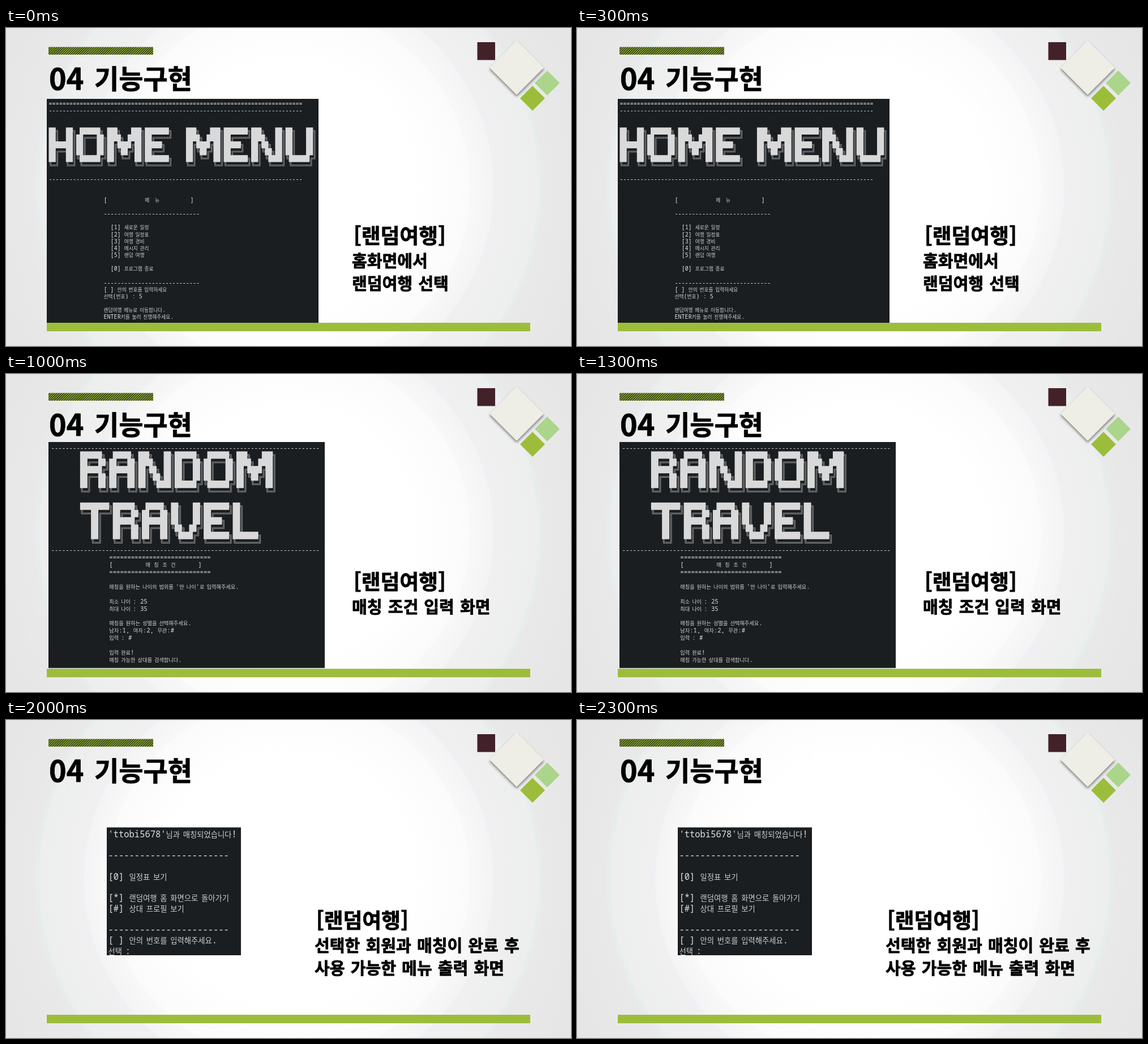
Animation of 998x561 px, one loop 2.5 s. Source, as an HTML page:

```html
<!DOCTYPE html>
<html lang="ko">
<head>
<meta charset="utf-8">
<style>
  html, body { margin: 0; width: 100%; height: 100%; overflow: hidden; background: #e6e6e7; }
  svg { display: block; }
  text { white-space: pre; }
  .term { font-family: "Noto Sans Mono", monospace; fill: #e0e0e0; }
  .ko { font-family: "Noto Sans CJK KR", sans-serif; font-size: .861em; word-spacing: .153em; fill: #cfcfcf; }
  .title { font-family: "Noto Sans CJK KR", sans-serif; font-weight: 900; word-spacing: 2px;
    stroke: #000; stroke-width: .8; stroke-linejoin: round; }
  .cream { filter: drop-shadow(0 3px 2px #0007); }
</style>
</head>
<body>
<svg width="998" height="561" viewBox="0 0 998 561">
  <defs>
    <radialGradient id="rings" gradientUnits="userSpaceOnUse" cx="499.5" cy="280.5" r="580">
      <stop offset=".38" stop-color="#fff"/>
      <stop offset=".55" stop-color="#fbfbfb"/>
      <stop offset=".555" stop-color="#f8f8f8"/>
      <stop offset=".622" stop-color="#f4f4f5"/>
      <stop offset=".624" stop-color="#edf1f6"/>
      <stop offset=".632" stop-color="#f0f0f1"/>
      <stop offset=".758" stop-color="#edeeee"/>
      <stop offset=".764" stop-color="#e5eeee"/>
      <stop offset=".776" stop-color="#e9e9ea"/>
      <stop offset="1" stop-color="#e5e5e6"/>
    </radialGradient>
    <pattern id="hatch" width="2.9" height="2.9" patternUnits="userSpaceOnUse" patternTransform="rotate(45)">
      <rect width="2.9" height="2.9" fill="#9cbd3c"/>
      <rect width="1.4" height="2.9" fill="#1c220c"/>
    </pattern>
  </defs>
  <rect width="998" height="561" fill="url(#rings)"/>
  <rect x="75" y="33.5" width="185" height="13.5" fill="url(#hatch)"/>
  <rect x="832.5" y="25" width="31.5" height="31.5" fill="#432129"/>
  <path class="cream" d="M902 22l48 48-48 48-48-48z" fill="#eeeee6"/>
  <path d="M956 75l22 22-22 22-22-22z" fill="#abd58b"/>
  <path d="M930 102l22 22-22 22-22-22z" fill="#9cbd3c"/>
  <text class="title" x="76" y="109" font-size="52">04</text>
  <text class="title" x="156" y="106.5" font-size="47">기능구현</text>
  <g id="stage"></g>
  <rect x="72" y="520" width="854" height="15" fill="#9cbd3c"/>
</svg>
<script>
const GLYPHS = {
  ' ': '    ',
  H: '██╗  ██╗/██║  ██║/███████║/██╔══██║/██║  ██║/╚═╝  ╚═╝',
  O: ' ██████╗ /██╔═══██╗/██║   ██║/██║   ██║/╚██████╔╝/ ╚═════╝',
  M: '███╗   ███╗/████╗ ████║/██╔████╔██║/██║╚██╔╝██║/██║ ╚═╝ ██║/╚═╝     ╚═╝',
  E: '███████╗/██╔════╝/█████╗/██╔══╝/███████╗/╚══════╝',
  N: '███╗   ██╗/████╗  ██║/██╔██╗ ██║/██║╚██╗██║/██║ ╚████║/╚═╝  ╚═══╝',
  U: '██╗   ██╗/██║   ██║/██║   ██║/██║   ██║/╚██████╔╝/ ╚═════╝',
  R: '██████╗ /██╔══██╗/██████╔╝/██╔══██╗/██║  ██║/╚═╝  ╚═╝',
  A: ' █████╗ /██╔══██╗/███████║/██╔══██║/██║  ██║/╚═╝  ╚═╝',
  D: '██████╗ /██╔══██╗/██║  ██║/██║  ██║/██████╔╝/╚═════╝',
  T: '████████╗/╚══██╔══╝/   ██║/   ██║/   ██║/   ╚═╝',
  V: '██╗   ██╗/██║   ██║/██║   ██║/╚██╗ ██╔╝/ ╚████╔╝/  ╚═══╝',
  L: '██╗     /██║/██║/██║/███████╗/╚══════╝'
};
// Direction of the horizontal and vertical arm of each corner
const CORNERS = { '╔': [1, 1], '╗': [-1, 1], '╚': [1, -1], '╝': [-1, -1] };
const dash = n => '-'.repeat(n), double = n => '='.repeat(n);
const spaced = word => [...word].join('\u00a0');

// box: panel x, y, right, bottom; x0, y0: first column and middle of the first row
// w, h: cell size; art: [row, col, word]; lines: [row, col, text]
const SCENES = [
  { box: [72, 125, 552, 520], x0: 75.5, y0: 133, w: 6.06, h: 12.16,
    art: [[4, 0, 'HOME MENU']],
    lines: [
      [0, 0, double(74)], [1, 0, dash(74)], [11, 0, dash(74)],
      [14, 16, '['], [14, 28, '메  뉴'], [14, 41.3, ']'], [16, 16, dash(28)],
      [18, 18, '[1] 새로운 일정'], [19, 18, '[2] 여행 일정표'], [20, 18, '[3] 여행 경비'],
      [21, 18, '[4] 메시지 관리'], [22, 18, '[5] 랜덤 여행'], [24, 18, '[0] 프로그램 종료'],
      [26, 16, dash(28)], [27, 16, '[ ] 안의 번호를 입력하세요'], [28, 16, '선택(번호) : 5'],
      [30, 16, '랜덤여행 메뉴로 이동합니다.'], [31, 16, 'ENTER키를 눌러 진행해주세요.']],
    caption: ['홈화면에서', '랜덤여행 선택'] },
  { box: [72, 122, 539.5, 520], x0: 77.7, y0: 130, w: 6.16, h: 12.37,
    art: [[3, 8, 'RANDOM'], [10, 8, 'TRAVEL']],
    lines: [
      [0, 0, dash(74)], [1, 0, double(74)], [16, 0, dash(74)],
      [18, 16, '['], [18, 26, spaced('랜덤여행')], [18, 40.5, ']'], [19, 16, dash(28)],
      [21, 16, '[1] 매칭 상대 찾기'], [22, 16, '[2] 매칭 상대 프로필 보기'],
      [24, 16, '[*] 홈 화면으로 돌아가기'], [26, 16, dash(28)],
      [27, 16, '[ ] 안의 번호를 입력하세요'], [28, 16, '입력 : 1'],
      [30, 16, '매칭 상대 찾기 메뉴로 이동합니다.'], [31, 16, 'ENTER키를 눌러 진행해주세요.']],
    caption: ['랜덤여행 홈 화면'] },
  { box: [75, 120, 563, 518.7], x0: 79.5, y0: 130, w: 6.42, h: 12.9,
    art: [[1, 8, 'RANDOM'], [8, 8, 'TRAVEL']],
    lines: [
      [0, 0, dash(74)], [14, 0, dash(74)], [15, 16, double(28)],
      [16, 16, '['], [16, 26, spaced('매칭조건')], [16, 40.5, ']'], [17, 16, double(28)],
      [19, 16, "매칭을 원하는 나이의 범위를 '만 나이'로 입력해주세요."],
      [21, 16, '최소 나이 : 25'], [22, 16, '최대 나이 : 35'],
      [24, 16, '매칭을 원하는 성별을 선택해주세요.'], [25, 16, '남자:1, 여자:2, 무관:#'],
      [26, 16, '입력 : #'], [28, 16, '입력 완료!'], [29, 16, '매칭 가능한 상대를 검색합니다.']],
    caption: ['매칭 조건 입력 화면'] },
  { box: [77, 111, 474, 518.7], x0: 82.8, y0: 114, w: 5.25, h: 10.51,
    art: [[3, 8, 'RANDOM'], [10, 8, 'TRAVEL']],
    lines: [
      [0, 0, dash(74)], [1, 0, double(74)], [16, 0, dash(74)],
      [17, 24, '['], [17, 32, '매칭 가능 목록'], [17, 45.5, ']'], [19, 0, double(73)],
      [20, 0, '번호'], [20, 8, '아이디'], [20, 24, '생년'], [20, 32, '성별'], [20, 40, '날짜'], [20, 56, '공통테마'],
      [21, 0, double(73)],
      [22, 0, '[1]'], [22, 8, 'mopvk4071'], [22, 24, '1964'], [22, 32, '여'], [22, 40, '20190310'], [22, 56, '맛집 카페 카페'],
      [23, 0, dash(73)],
      [24, 0, '[2]'], [24, 8, 'ttobi5678'], [24, 24, '1998'], [24, 32, '여'], [24, 40, '20190311'], [24, 56, '카페 숙소 카페'],
      [25, 40, '20190312'], [25, 56, '카페 숙소 맛집'], [26, 0, double(73)],
      [29, 0, '[*] 매칭 홈 화면으로 돌아가기'],
      [31, 0, '매칭을 원하는 상대의 [ ] 안의 번호를 입력하세요.'], [32, 0, dash(36)], [33, 0, '선택 : 2'],
      [35, 0, "'ttobi5678'님을 선택하셨습니다."],
      [37, 0, '선택하신 회원님과 매칭을 진행하시겠습니까? ( Y / N )'], [38, 0, '입력 : Y']],
    caption: ['매칭 가능한 회원 목록', '출력 화면'] },
  { box: [178, 189.5, 415, 415], x0: 180.5, y0: 201.5, w: 9.28, h: 18.72, art: [],
    lines: [
      [0, 0, "'ttobi5678'님과 매칭되었습니다!"], [2, 0, dash(23)], [4, 0, '[0] 일정표 보기'],
      [6, 0, '[*] 랜덤여행 홈 화면으로 돌아가기'], [7, 0, '[#] 상대 프로필 보기'],
      [9, 0, dash(23)], [10, 0, '[ ] 안의 번호를 입력해주세요.'], [11, 0, '선택 :']],
    caption: ['선택한 회원과 매칭이 완료 후', '사용 가능한 메뉴 출력 화면'], at: [548, 353] }
];

// Solid cells become rectangles, box characters become double lines
function banner({ x0, y0, w, h }, [row, col, word]) {
  let solid = '', lines = '';
  const gap = w * .14;
  for (const letter of word) {
    const rows = GLYPHS[letter].split('/');
    rows.forEach((cells, r) => [...cells].forEach((cell, c) => {
      const x = x0 + (col + c) * w, cy = y0 + (row + r) * h, cx = x + w / 2;
      if (cell === '█') solid += `M${x} ${cy - h / 2}h${w + .2}v${h + .2}h${-w - .2}z`;
      for (const k of [-gap, gap]) {
        if (cell === '═') lines += `M${x} ${cy + k}h${w}`;
        if (cell === '║') lines += `M${cx + k} ${cy - h / 2}v${h}`;
        if (CORNERS[cell]) {
          const [sx, sy] = CORNERS[cell];
          lines += `M${cx + sx * w / 2} ${cy - sy * k}H${cx - sx * k}V${cy + sy * h / 2}`;
        }
      }
    }));
    col += rows[0].length;
  }
  return `<path d="${lines}" fill="none" stroke="#b4b4b4" stroke-width="${w * .12}"/><path d="${solid}" fill="#d9d9d9"/>`;
}

function textLine({ x0, y0, w, h }, [row, col, text]) {
  const runs = text.replace(/[가-힣]+ ?/g, '<tspan class="ko">$&</tspan>');
  return `<text class="term" x="${x0 + col * w}" y="${y0 + row * h + w * .58}" font-size="${w / .6}">${runs}</text>`;
}

function caption({ caption, at: [x, y] = [614, 366] }) {
  const title = (text, dx, dy, size) =>
    `<text class="title" x="${x + dx}" y="${y + dy}" font-size="${size}">${text}</text>`;
  return title('[랜덤여행]', 0, 13.6, 36.7) +
    caption.map((text, i) => title(text, -3, 56 + i * 40, 29.1)).join('');
}

const stage = document.getElementById('stage');
stage.innerHTML = SCENES.map(scene => {
  const [l, t, r, b] = scene.box;
  return `<g><rect x="${l}" y="${t}" width="${r - l}" height="${b - t}" fill="#1a1e21"/>` +
    scene.art.map(a => banner(scene, a)).join('') +
    scene.lines.map(line => textLine(scene, line)).join('') + caption(scene) + '</g>';
}).join('');

function tick() {
  const current = Math.floor(performance.now() % 2500 / 500);
  [...stage.children].forEach((g, i) => g.style.display = i === current ? '' : 'none');
  requestAnimationFrame(tick);
}
tick();
</script>
</body>
</html>
```
